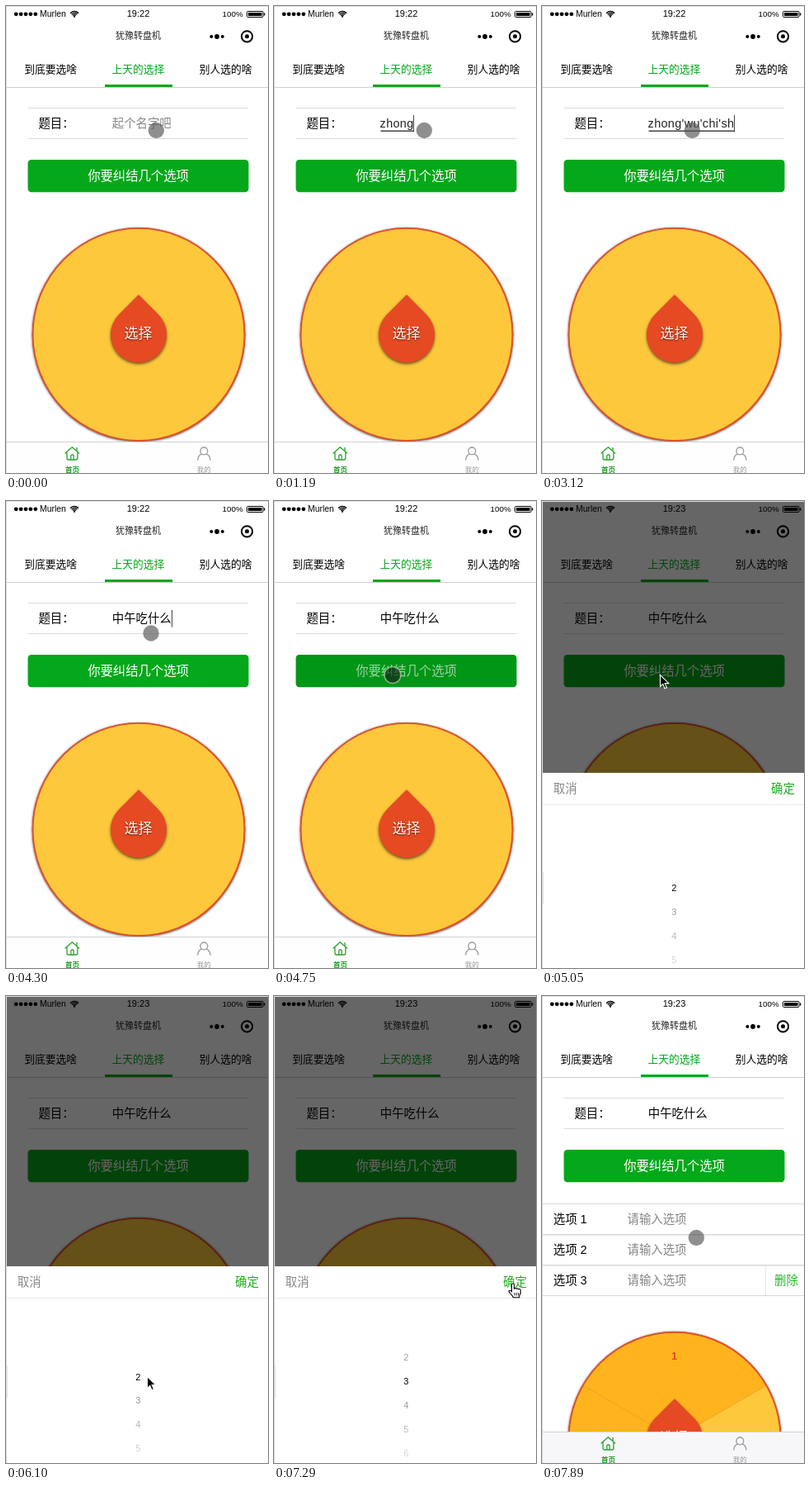
Write an HTML page with a canvas that moves like this. It is 318 px wide and 565 px high and loops after 8 s.

```html
<!DOCTYPE html>
<html lang="zh-CN">
<head>
<meta charset="utf-8">
<style>
html, body { margin: 0; width: 100%; height: 100%; overflow: hidden; background: #fff; }
canvas { display: block; width: 318px; height: 565px; }
</style>
</head>
<body>
<canvas id="stage"></canvas>
<script>
const W = 318, H = 565, LOOP = 8000;
const GREEN = '#04a81a', RED = '#e64a23', YELLOW = '#fdc83c';
const SANS = '"Liberation Sans", Arial, sans-serif';
const CJK = '"Noto Sans CJK SC", "Noto Sans CJK", sans-serif';

const canvas = document.getElementById('stage');
const c = canvas.getContext('2d');
const dpr = window.devicePixelRatio || 1;
canvas.width = W * dpr;
canvas.height = H * dpr;

// Stepped tracks: [start, value...]
const typing = [
  [600, 'z'], [890, 'zh'], [1040, 'zho'], [1190, 'zhong'],
  [1480, "zhong'w"], [1630, "zhong'wu"], [2080, "zhong'wu'c"], [2370, "zhong'wu'ch"],
  [2820, "zhong'wu'chi"], [2970, "zhong'wu'chi's"], [3120, "zhong'wu'chi'sh"],
  [3270, "zhong'wu'chi'shen"], [3420, "zhong'wu'chi'shen'm"], [3560, "zhong'wu'chi'shen'me"]
];
const pointer = [
  [0, 182.3, 150.5, dot], [4300, 176, 160, dot], [4450, 158, 190, dot], [4600, 144, 210, dot],
  [4750, 144, 210.5, pressedDot], [4900, 143, 210, arrow], [5200, 149, 284, arrow],
  [5350, 156, 345, arrow], [5500, 164, 410, arrow], [5650, 169, 452, arrow],
  [5800, 170, 467, arrow], [6100, 171, 460, arrow], [6250, 172, 448, arrow],
  [6400, 173, 440, arrow], [6700, 198, 420, arrow], [6850, 242, 385, arrow],
  [7000, 280, 354, hand], [7140, 290, 348, hand], [7590, 284, 342, dot],
  [7740, 232, 315, dot], [7890, 187.3, 292.5, dot]
];
const sheetTrack = [[0, 0], [4900, .6], [5050, .992], [5200, 1], [7440, .55], [7590, 0]];
const scrollTrack = [[0, 0], [6100, .2], [6250, .6], [6400, .92], [6550, 1]];

function at(track, t) {
  let found = track[0];
  for (const step of track) if (step[0] <= t) found = step;
  return found;
}

function text(s, x, y, size, color, { align = 'left', font = CJK, weight = 400 } = {}) {
  c.font = `${weight} ${size}px ${font}`;
  c.textAlign = align;
  c.fillStyle = color;
  c.fillText(s, x, y + size * .345);
}

function rect(x, y, w, h, color) {
  c.fillStyle = color;
  c.fillRect(x, y, w, h);
}

function disc(x, y, r, color) {
  c.beginPath();
  c.arc(x, y, r, 0, Math.PI * 2);
  c.fillStyle = color;
  c.fill();
}

function ring(x, y, r, width, color) {
  c.beginPath();
  c.arc(x, y, r, 0, Math.PI * 2);
  c.lineWidth = width;
  c.strokeStyle = color;
  c.stroke();
}

function path(d, stroke, width, fill) {
  const p = new Path2D(d);
  if (fill) { c.fillStyle = fill; c.fill(p); }
  c.lineWidth = width;
  c.strokeStyle = stroke;
  c.stroke(p);
}

function withShadow(color, blur, dy, draw) {
  c.save();
  c.shadowColor = color;
  c.shadowBlur = blur * dpr;
  c.shadowOffsetY = dy * dpr;
  draw();
  c.restore();
}

function statusBar(clock) {
  for (let i = 0; i < 5; i++) disc(12.2 + i * 5.9, 9.8, 2.4, '#000');
  text('Murlen', 41, 9.5, 10.4, '#000', { font: SANS });
  for (const r of [2.5, 4.6, 6.8]) {
    c.beginPath();
    c.arc(83, 13.3, r, -Math.PI * .76, -Math.PI * .24);
    c.lineWidth = 1.5;
    c.strokeStyle = '#000';
    c.stroke();
  }
  disc(83, 12.8, 1.1, '#000');
  text(clock, 160.5, 9.3, 11, '#000', { align: 'center', font: SANS });
  text('100%', 262.6, 9.6, 9.8, '#000', { font: SANS });
  path('M293.500 6.500h17.500a1 1 0 0 1 1 1v5a1 1 0 0 1-1 1h-17.500a1 1 0 0 1-1-1v-5a1 1 0 0 1 1-1z', '#000', 1);
  rect(294, 8, 16.5, 4, '#000');
  rect(313, 8.5, 1.3, 3, '#000');
}

function header(clock) {
  statusBar(clock);
  text('犹豫转盘机', 160.5, 36, 11, '#222', { align: 'center' });
  disc(249.3, 37, 2, '#000');
  disc(256, 37, 2.9, '#000');
  disc(262.8, 37, 2, '#000');
  ring(292.5, 36.8, 6.6, 2, '#000');
  disc(292.5, 36.8, 2.5, '#000');
  ['到底要选啥', '上天的选择', '别人选的啥'].forEach((s, i) =>
    text(s, 54.2 + i * 106.2, 76.2, 12.75, i === 1 ? GREEN : '#000', { align: 'center' }));
  rect(1, 98, W, 1, '#cfcfcf');
  rect(120, 95, 82, 3, GREEN);
}

function field(t) {
  rect(26.5, 123, 267.5, 1, '#dcdcdc');
  rect(26.5, 160, 267.5, 1, '#dcdcdc');
  text('题目：', 39.4, 142, 14.4, '#000');
  let end = 129;
  if (t < 600) {
    text('起个名字吧', 128.8, 142, 14.4, '#858585', { weight: 300 });
  } else if (t < 3710) {
    const s = at(typing, t)[1];
    c.letterSpacing = '0.35px';
    text(s, 128.6, 142.2, 14.4, '#222', { font: SANS });
    end += c.measureText(s).width;
    c.letterSpacing = '0px';
    rect(129.5, 150.5, end - 129.5, 1.5, '#444');
  } else {
    text('中午吃什么', 128.8, 142, 14.4, '#000');
    end += 72;
  }
  if (t >= 150 && t < 4600) rect(Math.floor(end), 132, 1, 20.5, '#444');
}

function button(pressed) {
  c.beginPath();
  c.roundRect(26.5, 186, 268, 39.2, 4.2);
  c.fillStyle = pressed ? '#029616' : GREEN;
  c.fill();
  text('你要纠结几个选项', 160.5, 205.5, 15.35, pressed ? 'rgba(255,255,255,.6)' : '#fff',
    { align: 'center', weight: 300 });
}

function options() {
  rect(1, 251, W, 1, '#dcdcdc');
  for (let i = 0; i < 3; i++) {
    const y = 269.7 + i * 37.3;
    text('选项 ' + (i + 1), 13.8, y, 14.4, '#000', { font: '"Liberation Sans", ' + CJK });
    text('请输入选项', 103.5, y, 14.4, '#858585', { weight: 300 });
    rect(1, [288, 325, 362][i], W, i < 2 ? 1.5 : 1, '#d8d8d8');
  }
  rect(271, 326, 1, 36, '#e6e6e6');
  text('删除', 282, 344.3, 14.4, '#1fb81f');
}

function wheel(y, split) {
  const x = 161, r = 128.4;
  withShadow('rgba(0,0,0,.8)', 3, .6, () => disc(x, y, r + .9, RED));
  disc(x, y, r, YELLOW);
  if (split) {
    const a = -Math.PI / 6, third = Math.PI * 2 / 3;
    c.beginPath();
    c.moveTo(x, y);
    c.arc(x, y, r, a + third, a);
    c.fillStyle = '#ffb41e';
    c.fill();
    for (let i = 0; i < 3; i++) {
      c.beginPath();
      c.moveTo(x, y);
      c.lineTo(x + r * Math.cos(a + i * third), y + r * Math.sin(a + i * third));
      c.lineWidth = 1;
      c.strokeStyle = '#f7a021';
      c.stroke();
    }
    text('1', x - .5, y - 99.5, 13, RED, { align: 'center', font: SANS, weight: 700 });
  }
  ring(x, y, r, 1.7, '#e0502a');

  // Teardrop: a disc with one square corner pointing up
  const k = 34 * Math.SQRT1_2;
  withShadow('rgba(0,0,0,.6)', 3.5, 1.8, () => {
    c.beginPath();
    c.moveTo(x, y - 2 * k);
    c.lineTo(x + k, y - k);
    c.arc(x, y, 34, -Math.PI / 4, Math.PI * 1.25);
    c.closePath();
    c.fillStyle = RED;
    c.fill();
  });
  withShadow('rgba(0,0,0,.6)', 2, 1, () =>
    text('选择', x - .5, y - .8, 17, '#fbf3ee', { align: 'center', weight: 300 }));
}

function tabBar(color) {
  rect(1, 527, W, 38, color);
  rect(1, 527, W, 1, '#d2d2d4');
  c.lineJoin = c.lineCap = 'round';
  path('M72 541L80.300 533.800l8.300 7.200M74 540v7q0 2 2 2h8.800q2 0 2-2v-7M86 537.500v-3M78.800 548.500v-4.500q0-1 1-1h1.300q1 0 1 1v4.500', '#2ba32f', 1.3);
  ring(240.3, 538.4, 4.4, 1.3, '#9a9a9a');
  path('M232.700 549q.5-5.500 4.800-6.800M247.900 549q-.5-5.500-4.800-6.800', '#9a9a9a', 1.3);
  c.lineJoin = 'miter';
  c.lineCap = 'butt';
  text('首页', 80.5, 561.3, 8.5, '#1f9d27', { align: 'center', weight: 700 });
  text('我的', 240.3, 561.3, 8.5, '#999', { align: 'center' });
}

function sheet(p, scroll) {
  rect(0, 0, W, H, `rgba(0,0,0,${.6 * Math.min(1, p * 1.02)})`);
  const top = H - 238 * p;
  rect(0, top, W, 238, '#fff');
  text('取消', 13.8, top + 19, 14.4, '#888', { weight: 300 });
  text('确定', 278, top + 19, 14.4, '#1aad19');
  rect(1, top + 38, W, 1, '#e9e9e9');
  rect(1, top + 120, 1, 39, '#e4e4e4');
  for (let n = 2; n <= 6; n++) {
    const d = n - 2 - scroll, far = Math.abs(d);
    const alpha = far < .5 ? 1 : Math.max(.06, .5 - .11 * far);
    text(String(n), 160.3, top + 139.5 + d * 28.8, 11, `rgba(0,0,0,${alpha})`,
      { align: 'center', font: SANS });
  }
}

function dot(x, y) {
  disc(x, y, 9.7, 'rgba(85,85,85,.66)');
}

function pressedDot(x, y) {
  disc(x, y, 10, 'rgba(20,30,25,.66)');
  ring(x, y, 10, 1.5, 'rgba(225,235,225,.55)');
}

function drawAt(x, y, d, stroke, width, fill) {
  c.save();
  c.translate(x, y);
  path(d, stroke, width, fill);
  c.restore();
}

function arrow(x, y) {
  drawAt(x, y, 'M.5 .5v14l3.200-3 2.300 5.300 2.400-1-2.300-5.200h4.700z', '#fff', 1.1, '#000');
}

function hand(x, y) {
  drawAt(x, y, 'M-1.500 9.500V1.300q0-1.500 1.500-1.500t1.500 1.500V6q1.200-1.200 2.600.2 1.400-1 2.500.4 2.500-.6 2.700 1.500v3.500l-1.500 3v2.200H.5q-1.500-3-4-5.200-2.200-2.600-1-3.200 1.400-.6 3 1.100z', '#000', 1.1, '#fff');
  drawAt(x, y, 'M2 11v3.500M4.300 11v3.500M6.600 11v3.500', '#000', .9);
}

function draw(t) {
  c.setTransform(dpr, 0, 0, dpr, 0, 0);
  rect(0, 0, W, H, '#fff');
  const done = t >= 7590;
  header(t < 4900 ? '19:22' : '19:23');
  field(t);
  button(t >= 4750 && t < 4900);
  if (done) options();
  wheel(done ? 535.3 : 397.4, done);
  tabBar(done ? '#f7f7fa' : '#fefefe');
  const p = at(sheetTrack, t)[1];
  if (p > 0) sheet(p, at(scrollTrack, t)[1]);
  rect(0, 0, 1, H, '#dedede');
  rect(0, 0, W, 1, '#dedede');
  const [, x, y, shape] = at(pointer, t);
  shape(x, y);
}

const start = performance.now();
function tick() {
  draw((performance.now() - start) % LOOP);
  requestAnimationFrame(tick);
}
tick();
</script>
</body>
</html>
```
